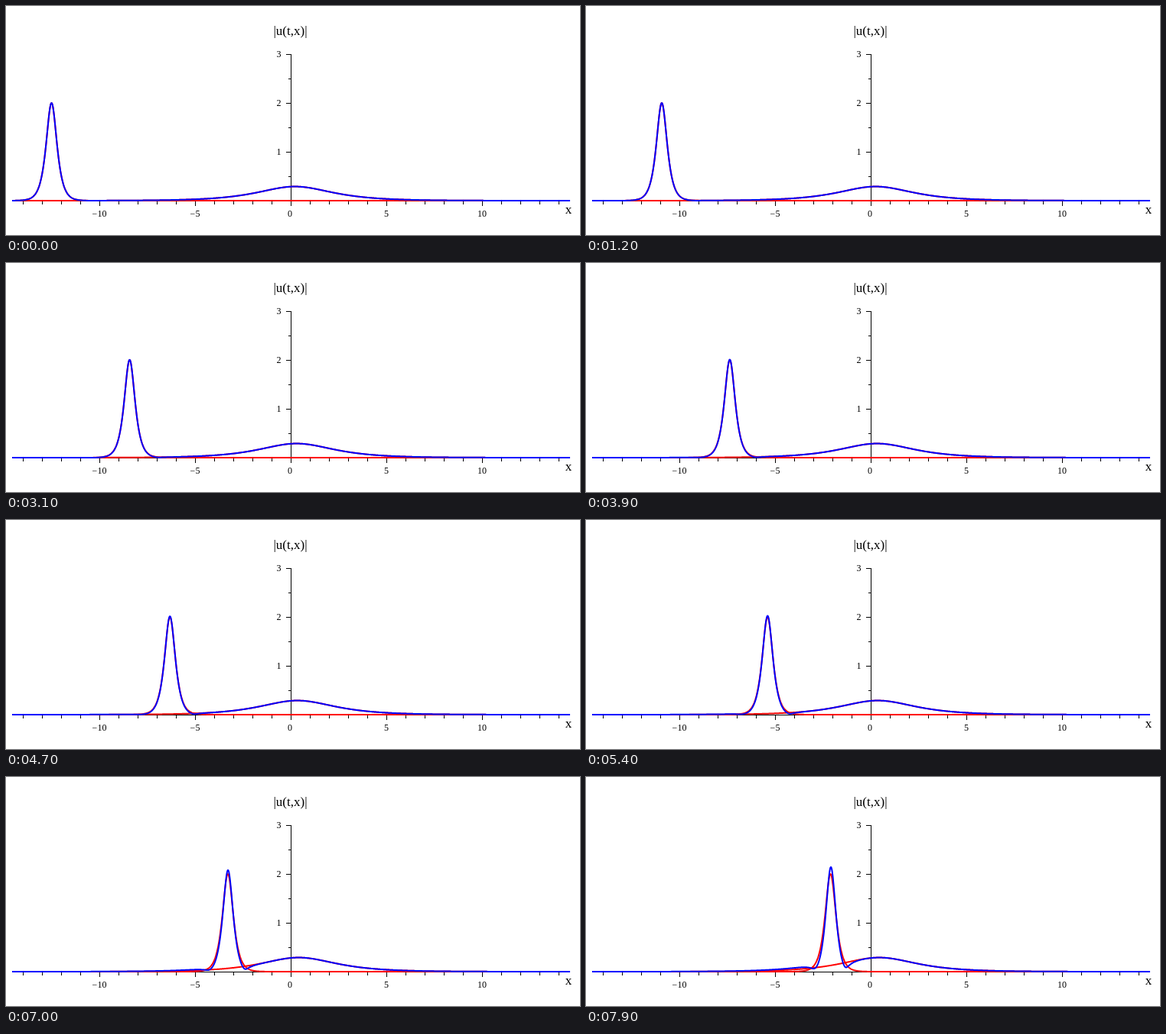
Recreate the animation shown at these times as an HTML page with a canvas. Size 750 by 300 pixels, loop 8 s.

```html
<!DOCTYPE html>
<html lang="en">
<head>
<meta charset="utf-8">
<title>Soliton collision</title>
<style>
html, body { margin: 0; width: 750px; height: 300px; overflow: hidden; background: #fff; }
canvas { display: block; }
</style>
</head>
<body>
<canvas id="stage" width="750" height="300"></canvas>
<script>
const ctx = document.getElementById('stage').getContext('2d');
const LOOP = 8000, STEP = 100;
const X0 = 372, Y0 = 255, UX = 25, UY = 64, LEFT = 8, RIGHT = 737;

// Two waves of |u| = k/2 sech(k(x - c)), each travelling at speed k^2.
const K1 = 4, K2 = 0.577, PHASE = 0.85 * Math.PI;
const S = ((K1 - K2) / (K1 + K2)) ** 2;
const COS = Math.cos(PHASE), SIN = Math.sin(PHASE);

const single = (k, c) => x => k / 2 / Math.cosh(k * (x - c));

// Exact two-soliton solution that starts as the two separate waves.
function pair(c1, c2) {
  return x => {
    const a = Math.exp(K1 * (x - c1));
    const b = Math.exp(K2 * (x - c2)) / S;
    const big = 2 * K1 * a * (1 + S * b * b);
    const small = 2 * K2 * b * (1 + S * a * a);
    const f = 1 + a * a + b * b + 2 * (1 - S) * a * b * COS + S * S * a * a * b * b;
    return Math.hypot(big + small * COS, small * SIN) / f / 2;
  };
}

function curve(fn, color) {
  ctx.strokeStyle = color;
  ctx.lineWidth = 2;
  ctx.lineJoin = 'round';
  ctx.beginPath();
  for (let px = LEFT; px <= RIGHT; px += 0.5) {
    ctx.lineTo(px, Y0 - UY * fn((px - X0) / UX));
  }
  ctx.stroke();
}

function text(str, x, y, size, align) {
  ctx.font = size + 'px "Liberation Serif", "Times New Roman", serif';
  ctx.textAlign = align;
  ctx.fillText(str, x, y);
}

function axes() {
  ctx.fillStyle = '#000';
  ctx.fillRect(LEFT, Y0, RIGHT - LEFT, 1);
  ctx.fillRect(X0, Y0 - 3 * UY, 1, 3 * UY);
  for (let i = -14; i <= 14; i++) {
    const major = i % 5 === 0, x = X0 + i * UX;
    ctx.fillRect(x, Y0, 1, major ? 7 : 5);
    if (major) text(String(i).replace('-', '\u2212'), x - (i ? 0 : 1), 276, 12, 'center');
  }
  for (let i = 1; i <= 6; i++) {
    const len = i % 2 ? 3 : 6, y = Y0 - i * UY / 2;
    ctx.fillRect(X0 - len, y, len, 1);
    if (i % 2 === 0) text(i / 2, 359.5, y + 4, 12, 'right');
  }
  text('|u(t,x)|', 371.5, 38, 17, 'center');
  text('x', 735, 272, 17, 'center');
}

function draw(ms) {
  const n = Math.floor((ms % LOOP) / STEP);
  const t = n * 10.4 / 79 / (K1 * K1);
  const c1 = -12.5 + K1 * K1 * t;
  const c2 = 0.22 + K2 * K2 * t;
  ctx.fillStyle = '#fff';
  ctx.fillRect(0, 0, 750, 300);
  axes();
  curve(single(K1, c1), '#f00');
  curve(single(K2, c2), '#f00');
  curve(pair(c1, c2), '#00f');
}

function tick() {
  draw(performance.now());
  requestAnimationFrame(tick);
}
tick();
</script>
</body>
</html>
```
